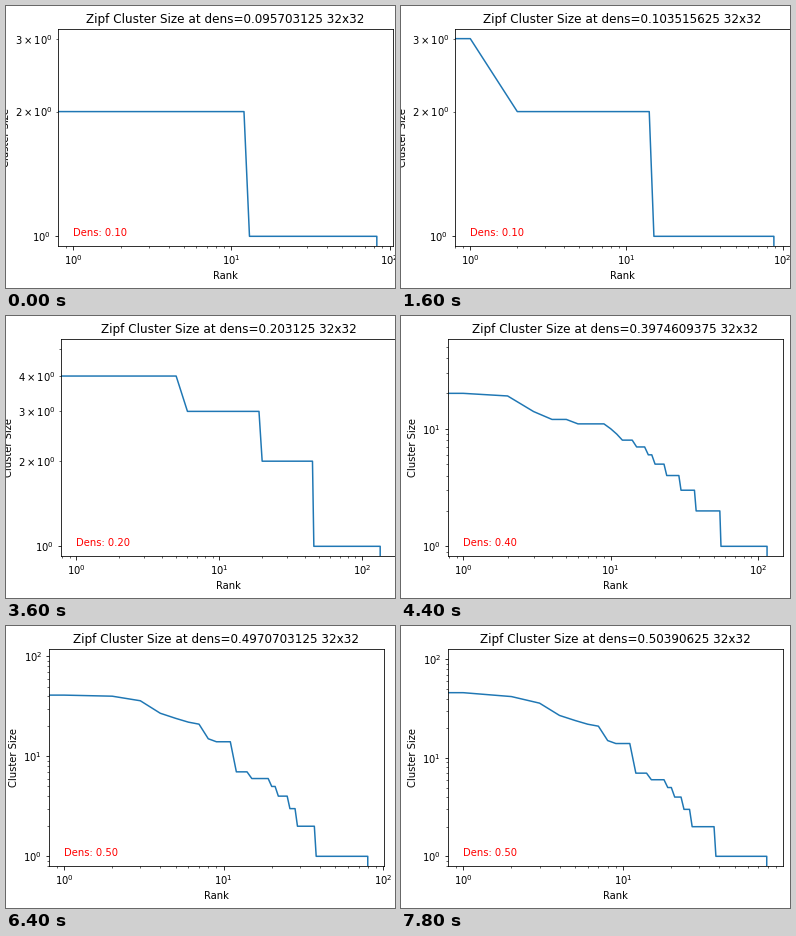
A matplotlib script for the animation above (8 s loop, 389x282 px).

```python
import matplotlib.pyplot as plt
import numpy as np
from matplotlib.animation import FuncAnimation

W, H, DPI = 389, 282, 72
AX_X, AX_Y, AX_W, AX_H = 54, 41.8, 334.8, 217.44
PAD = 7.2
SIDE = 32
STEPS = 10

# Per run: occupied sites, largest cluster and its growth, then the corners of
# the rank curve as (rank, size, rank drift, size drift); drifts default to 0.
RUNS = [
    (98, 3, 0, [(1, 2.2, 0, 1), (12, 2, 2), (83, 1, 6)]),
    (200, 5, 0, [(5, 4), (18, 3, 1), (44, 2, 1), (130, 1, 5)]),
    (405, 48, 0, [(1, 20), (2, 19), (3, 14), (5, 12, 1), (9, 11, 1),
                  (17, 7, 2), (29, 4, 1), (55, 2, -2), (117, 1, -9)]),
    (507, 94, 8, [(1, 40, 0, 6), (2, 40, 0, 2), (3, 36), (4, 27), (7, 21),
                  (8, 15), (11, 14), (12, 7), (14, 7), (19, 6, -1),
                  (25, 4, -2), (28, 3, -2), (37, 2), (80.8, 1, -2)]),
]

fig = plt.figure(figsize=(W / DPI, H / DPI), dpi=DPI, facecolor="white")
ax = fig.add_axes([0, 0, 1, 1])


def cluster_sizes(top, growth, corners, t):
    """Sizes by rank: power laws between the corners, cut to whole sites."""
    rank, size, drift, swell = np.array([(*c, 0, 0)[:4] for c in corners]).T
    rank = np.round(rank + drift * t)
    size = size + swell * t
    ranks = np.arange(1, rank[-1] + 1)
    sizes = np.exp(np.interp(np.log(ranks), np.log(rank), np.log(size)))
    return np.floor(np.r_[top + growth * t, sizes, 0] + 1e-9)


def place(left):
    ax.set_position([left / W, AX_Y / H, AX_W / W, AX_H / H])


def draw(i):
    run, step = divmod(i, STEPS)
    first, *curve = RUNS[run]
    dens = (first + step) / SIDE**2

    ax.clear()
    ax.plot(cluster_sizes(*curve, step / (STEPS - 1)))
    ax.set_xscale("log")
    ax.set_yscale("log")
    ax.set_title(f"Zipf Cluster Size at dens={dens} {SIDE}x{SIDE}")
    ax.set_xlabel("Rank")
    ax.set_ylabel("Cluster Size")
    ax.text(1, 1, f"Dens: {dens:.2f}", color="red")

    # Centre the padded plot on the stage, cropping what sticks out.
    place(AX_X)
    box = ax.get_tightbbox(fig.canvas.get_renderer())
    crop = int(box.width + 2 * PAD) // 2 - W // 2
    place(AX_X + PAD - crop - box.x0)
    return []


anim = FuncAnimation(fig, draw, frames=len(RUNS) * STEPS, interval=200,
                     init_func=lambda: draw(0), repeat=True, repeat_delay=0)
plt.show()
```
